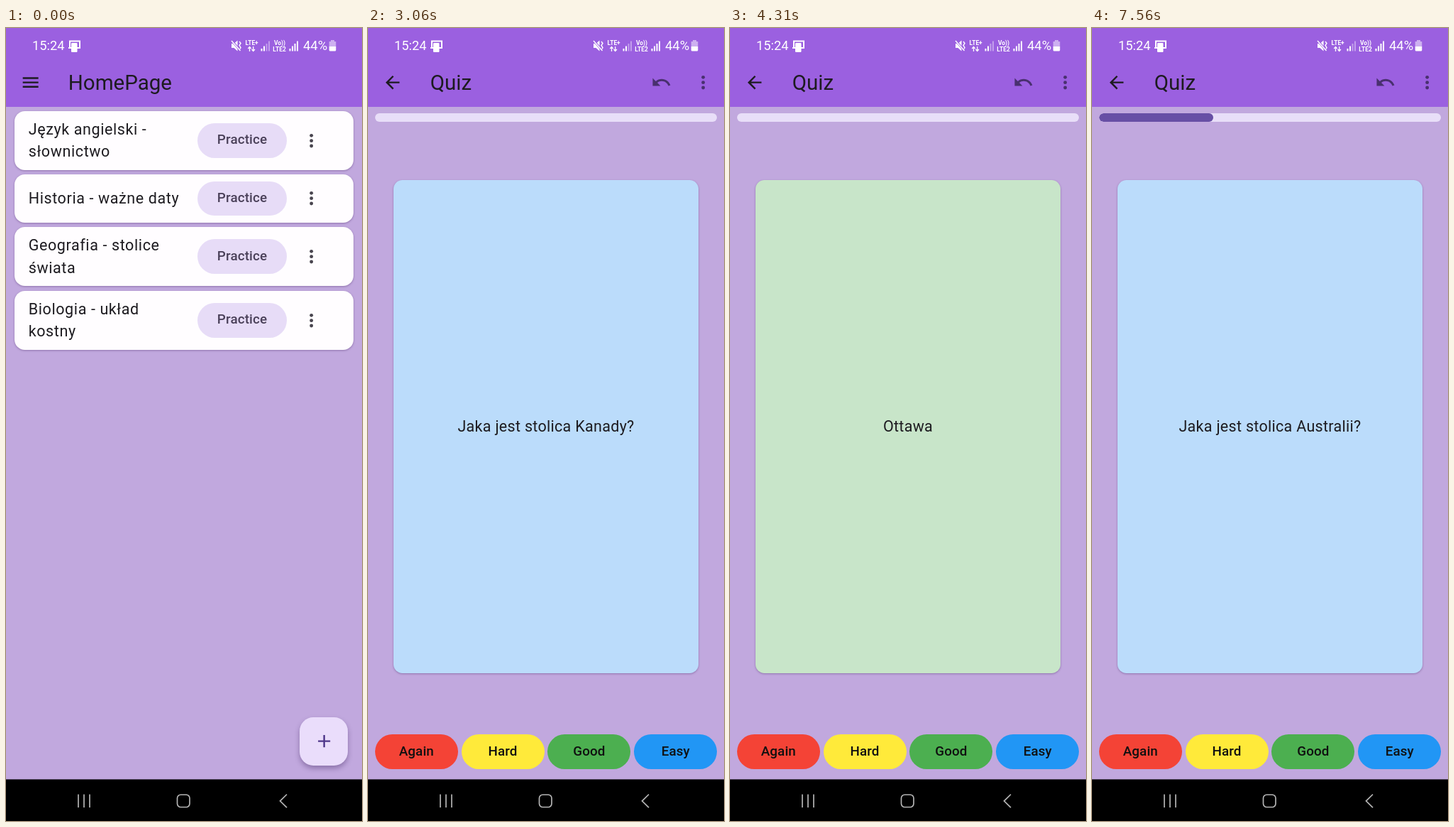
These frames come from a looping animation (502x1116 px, 8 s). An HTML page:

```html
<!DOCTYPE html>
<html lang="pl">
<head>
<meta charset="utf-8">
<title>Flashcards</title>
<style>
  html, body { margin: 0; width: 100%; height: 100%; overflow: hidden; background: #000; }
  body { font-family: Roboto, "Noto Sans", sans-serif; color: #1d1b20; }
  #stage { position: relative; width: 502px; height: 1116px; overflow: hidden; }
  #stage div, #stage svg { position: absolute; box-sizing: border-box; }
  #app, .page, #scrim { left: 0; top: 0; width: 502px; height: 1058px; overflow: hidden; }
  .page { background: #c1a8de; transform-origin: 251px 528.7px; }
  #scrim { background: #000; }
  .bar { left: 0; top: 0; width: 502px; height: 110.5px; background: #9b60e0; }
  .bar h1 { position: absolute; left: 87.8px; top: 57px; margin: 0; font: 400 29.5px/40px Roboto, sans-serif; }
  .icon { width: 29.3px; height: 29.3px; fill: #1d1b20; }
  .bar .icon { top: 61.7px; }
  .lead { left: 19.5px; }

  #stage .row { left: 12.2px; width: 477.6px; height: 83.2px; border-radius: 14.6px; background: #fffdff;
    box-shadow: 0 1px 3px rgba(60, 30, 90, .38); display: flex; align-items: center;
    padding-left: 19.5px; font-size: 21.5px; line-height: 31.5px; letter-spacing: .61px; }
  #stage .single { height: 68.3px; }
  .pill { display: flex; align-items: center; justify-content: center; height: 48.8px; border-radius: 24.4px;
    font-size: 18.8px; font-weight: 500; letter-spacing: .12px; overflow: hidden; }
  .row .pill { left: 257.8px; top: calc(50% - 24.4px); width: 126px; background: #e7dcf7; color: #4a4059; }
  .row .icon { left: 404.3px; top: calc(50% - 14.65px); fill: #49454f; }
  #fab { left: 414.1px; top: 969.5px; width: 68.4px; height: 68.4px; border-radius: 19.5px; background: #eaddfb;
    box-shadow: 0 4px 7px rgba(50, 25, 80, .36); }
  #fab .icon { left: 19.5px; top: 19.5px; fill: #4f378a; }

  #track { left: 9.8px; top: 120.3px; width: 482.4px; height: 12.2px; border-radius: 6.1px; background: #e8def8; overflow: hidden; }
  #fill { left: 0; top: 0; width: 160.8px; height: 100%; border-radius: 6.1px; background: #674fa5; }
  #card { left: 36px; top: 214px; width: 430px; height: 693.5px; border-radius: 12.5px;
    box-shadow: 0 1px 3px rgba(60, 30, 90, .38); text-align: center; font-size: 21.5px; letter-spacing: .3px; line-height: 694px; }
  .grade { top: 993.9px; width: 117px; color: #101010; }
  .grade span { position: relative; }
  #ink { left: 0; top: 0; width: 100%; height: 100%;
    background: radial-gradient(circle at 66px 36px, rgba(95, 120, 160, .75), rgba(70, 110, 170, .25) 62px); }

  #touch { width: 28px; height: 28px; margin: -14px; border-radius: 50%;
    background: rgba(255, 255, 255, .5); border: 1px solid rgba(130, 110, 160, .35); }
  #system { left: 0; top: 0; width: 502px; height: 1116px; font-family: Roboto, sans-serif; }
</style>
</head>
<body>
<svg width="0" height="0" style="position:absolute">
  <symbol id="more" viewBox="0 0 24 24"><circle cx="12" cy="6" r="2"/><circle cx="12" cy="12" r="2"/><circle cx="12" cy="18" r="2"/></symbol>
</svg>
<div id="stage">
  <div id="app">
    <div class="page" id="home">
      <div class="bar">
        <svg class="icon lead" viewBox="0 0 24 24"><path d="M3 6h18v2H3zM3 11h18v2H3zM3 16h18v2H3z"/></svg>
        <h1>HomePage</h1>
      </div>
      <div class="row" style="top:116.6px">Język angielski -<br>słownictwo<div class="pill">Practice</div><svg class="icon"><use href="#more"/></svg></div>
      <div class="row single" style="top:205.9px">Historia - ważne daty<div class="pill">Practice</div><svg class="icon"><use href="#more"/></svg></div>
      <div class="row" style="top:280.3px">Geografia - stolice<br>świata<div class="pill">Practice</div><svg class="icon"><use href="#more"/></svg></div>
      <div class="row" style="top:369.6px">Biologia - układ<br>kostny<div class="pill">Practice</div><svg class="icon"><use href="#more"/></svg></div>
      <div id="fab"><svg class="icon" viewBox="0 0 24 24"><path d="M19 13h-6v6h-2v-6H5v-2h6V5h2v6h6z"/></svg></div>
    </div>
    <div id="scrim"></div>
    <div class="page" id="quiz">
      <div class="bar">
        <svg class="icon lead" viewBox="0 0 24 24"><path d="M20 11H7.83l5.59-5.59L12 4l-8 8 8 8 1.41-1.41L7.83 13H20z"/></svg>
        <h1>Quiz</h1>
        <svg class="icon" viewBox="0 0 24 24" style="left:399.4px;fill:#49306f"><path d="M12.5 8c-2.65 0-5.05 1-6.9 2.6L2 7v9h9l-3.62-3.62c1.39-1.16 3.16-1.88 5.12-1.88 3.54 0 6.55 2.31 7.6 5.5l2.37-.78C21.08 11.03 17.15 8 12.5 8z"/></svg>
        <svg class="icon" style="left:458px;fill:#49306f"><use href="#more"/></svg>
      </div>
      <div id="track"><div id="fill"></div></div>
      <div id="card"></div>
      <div class="pill grade" style="left:9.8px;background:#f44336">Again</div>
      <div class="pill grade" style="left:131.6px;background:#ffea3a">Hard</div>
      <div class="pill grade" style="left:253.4px;background:#4caf50">Good</div>
      <div class="pill grade" style="left:375.3px;background:#2196f5"><div id="ink"></div><span>Easy</span></div>
    </div>
    <div id="touch"></div>
  </div>
  <svg id="system" viewBox="0 0 502 1116" fill="#fff">
    <text x="37" y="31.3" font-size="18.3">15:24</text>
    <path d="M90 27V18.5h14V27" fill="none" stroke="#fff" stroke-width="2"/>
    <path d="M88 27h4v2h-4zM100 27h5v2h-5z"/>
    <rect x="92" y="21" width="8.5" height="13" rx="1"/>
    <!-- muted speaker -->
    <path d="M318 22h3.5l5-4.5v15l-5-4.5H318z"/>
    <path d="M318 17.5l13 15" stroke="#9b60e0" stroke-width="3"/>
    <path d="M318 18l12.5 14M329 19l2 2.5-2 3 2 3-1 2" fill="none" stroke="#fff" stroke-width="1.4"/>
    <g font-size="8.4" font-weight="700">
      <text x="337.5" y="23.6">LTE+</text>
      <text x="378" y="23.6">Vo))</text>
      <text x="376.3" y="33">LTE2</text>
    </g>
    <path d="M343.5 33v-6.5M341.3 29l2.2-2.5 2.2 2.5M348.7 26v6.5M346.5 30l2.2 2.5 2.2-2.5" fill="none" stroke="#fff" stroke-width="1.3"/>
    <path d="M359.5 29h2v3.5h-2zM363 25.5h2v7h-2z"/>
    <path d="M366.5 22h2v10.5h-2zM370 18.5h2v14h-2z" opacity=".4"/>
    <path d="M399.5 29h2v3.5h-2zM403 25.5h2v7h-2zM406.5 22h2v10.5h-2zM410 18.5h2v14h-2z"/>
    <text x="419" y="31.3" font-size="18.4">44%</text>
    <path d="M458 17h5v2h2.3v7h-9.6v-7h2.3z" opacity=".5"/>
    <path d="M455.7 26h9.6v5a1.5 1.5 0 0 1-1.5 1.5h-6.6a1.5 1.5 0 0 1-1.5-1.5z"/>
    <rect y="1057.4" width="502" height="59" fill="#000"/>
    <g fill="none" stroke="#b4b4b4" stroke-width="1.7">
      <path d="M102 1078.5v18.5M110 1078.5v18.5M118 1078.5v18.5M396 1078.5l-9.5 9.3 9.5 9.3"/>
      <rect x="241.5" y="1079" width="17.5" height="17.5" rx="5"/>
    </g>
  </svg>
</div>
<script>
const LOOP = 8000;
const $ = id => document.getElementById(id);
const [home, scrim, quiz, card, fill, ink, touch] =
  ['home', 'scrim', 'quiz', 'card', 'fill', 'ink', 'touch'].map($);

// start, end and number of pictures of each moving stretch
const BURSTS = [[1630, 2060, 8], [3560, 4310, 13], [5880, 6560, 12]];
// start, end and place of each tap
const TAPS = [[1630, 1800, 342, 332], [3560, 3730, 330, 700], [5880, 6110, 441.5, 1030]];
const OPEN = 1735, OPEN_TIME = 300;
const FLIP = 3662, FLIP_TIME = 600;
const NEXT = 6000;

const clamp = x => Math.max(0, Math.min(1, x));
const ramp = (x, a, b) => clamp((x - a) / (b - a));

function snap(t) {
  for (const [a, b, n] of BURSTS) {
    if (t < a || t >= b) continue;
    const step = (b - a) / (n - 1);
    return a + step * Math.floor((t - a) / step + 0.1);
  }
  return t;
}

function bezier(x, x1, y1, x2, y2) {
  const at = (s, p, q) => 3 * (1 - s) * (1 - s) * s * p + 3 * (1 - s) * s * s * q + s * s * s;
  let lo = 0, hi = 1;
  for (let i = 0; i < 24; i++) {
    const mid = (lo + hi) / 2;
    if (at(mid, x1, x2) < x) lo = mid; else hi = mid;
  }
  return at(lo, y1, y2);
}

// Quick start, then a long settling
function zoomEase(p) {
  if (p <= 0 || p >= 1) return clamp(p);
  return p < 1 / 6
    ? 0.4 * bezier(p * 6, 0.05, 0, 0.1333, 0.06)
    : 0.4 + 0.6 * bezier((p - 1 / 6) * 1.2, 0.2083, 0.82, 0.25, 1);
}

function drawOpening(t) {
  const p = ramp(t, OPEN, OPEN + OPEN_TIME), zoom = zoomEase(p);
  home.style.transform = `scale(${1 + 0.05 * zoom})`;
  scrim.style.opacity = 0.6 * ramp(p, 0.2075, 0.4175);
  quiz.style.opacity = ramp(p, 0.125, 0.25);
  quiz.style.transform = `scale(${0.85 + 0.15 * zoom})`;
}

function drawCard(t) {
  const turn = Math.cos(Math.PI * ramp(t, FLIP, FLIP + FLIP_TIME));
  const next = t >= NEXT, answer = turn < 0 && !next;
  card.style.transform = `scaleX(${Math.abs(turn)})`;
  card.style.background = answer ? '#c8e5c9' : '#bbdcfb';
  card.textContent = answer ? 'Ottawa' : `Jaka jest stolica ${next ? 'Australii' : 'Kanady'}?`;
  fill.style.display = next ? 'block' : 'none';
}

function drawTouch(t) {
  const tap = TAPS.find(([a, b]) => t >= a && t < b);
  touch.style.display = tap ? 'block' : 'none';
  if (tap) {
    touch.style.left = tap[2] + 'px';
    touch.style.top = tap[3] + 'px';
  }
  ink.style.opacity = ramp(t, 5850, 6060) * (1 - ramp(t, 6120, 6540));
}

function draw() {
  const t = snap(performance.now() % LOOP);
  drawOpening(t);
  drawCard(t);
  drawTouch(t);
  requestAnimationFrame(draw);
}
draw();
</script>
</body>
</html>
```
